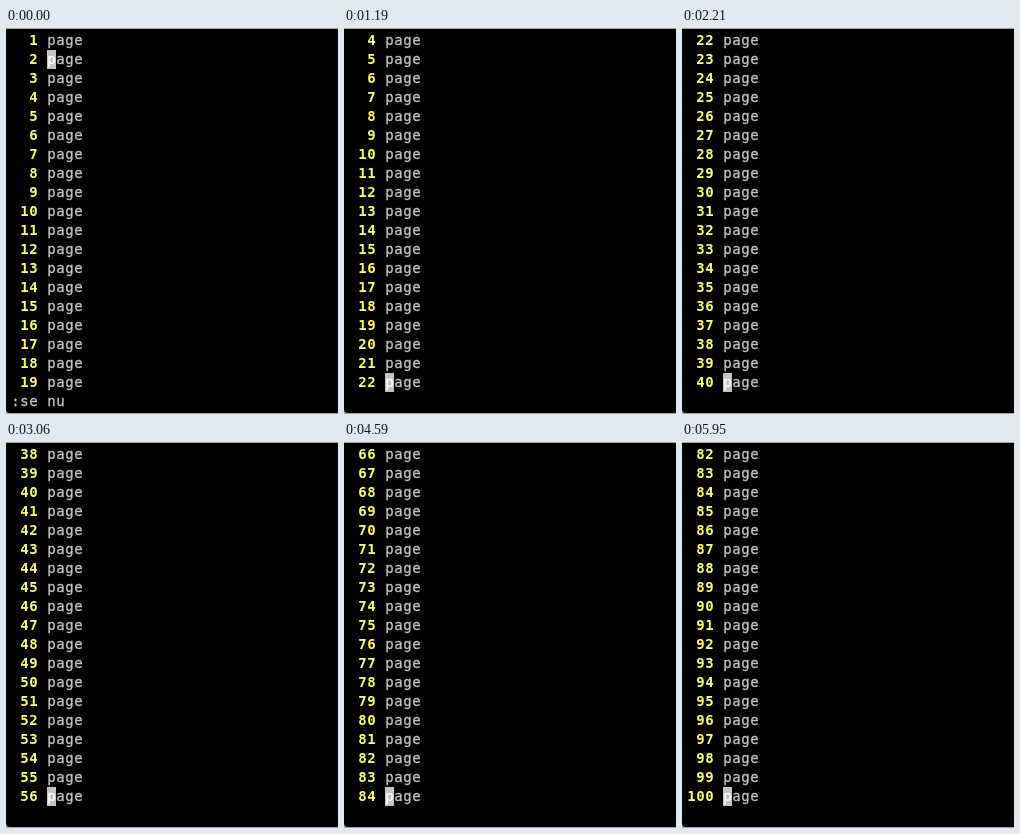
An HTML page with a canvas that plays this animation: 332x386 px, repeating every 6120 ms.

```html
<!DOCTYPE html>
<html lang="en">
<head>
<meta charset="utf-8">
<title>Scrolling numbered lines</title>
<style>
html, body { margin: 0; width: 332px; height: 386px; overflow: hidden; background: #000; }
canvas { display: block; }
</style>
</head>
<body>
<canvas id="stage" width="332" height="386"></canvas>
<script>
const ctx = document.getElementById('stage').getContext('2d');
const STEP = 170, STEPS = 36, ROWS = 19, ROW_H = 19, LEFT = 5, CHAR_W = 9;
const TEXT_X = LEFT + 4 * CHAR_W, WORD = 'page';
const GREY = '#c4c4c4', YELLOW = '#ffff5c';

// [step, line under the cursor]; the cursor runs evenly between these
const keys = [[0, 2], [7, 22], [13, 40], [18, 56], [23, 72], [31, 96], [35, 100]];

function cursorLine(step) {
  const i = Math.max(1, keys.findIndex(k => k[0] >= step));
  const [s0, l0] = keys[i - 1], [s1, l1] = keys[i];
  return Math.round(l0 + (l1 - l0) * (step - s0) / (s1 - s0));
}

// one character per terminal cell, slightly thickened
function write(text, x, row, color, weight = 'normal') {
  ctx.font = `${weight} 14px "DejaVu Sans Mono", monospace`;
  ctx.textAlign = 'center';
  ctx.fillStyle = ctx.strokeStyle = color;
  ctx.lineWidth = 0.3;
  [...text].forEach((char, i) => {
    const at = [char, x + (i + 0.5) * CHAR_W, 17 + row * ROW_H];
    ctx.fillText(...at);
    if (weight === 'normal') ctx.strokeText(...at);
  });
}

function draw(step) {
  const line = cursorLine(step);
  const top = Math.max(1, line - ROWS + 1);

  // window with thin edges above and below and a rounded lower corner
  ctx.fillStyle = '#a0a0a0';
  ctx.fillRect(0, 0, 332, 386);
  ctx.fillStyle = '#000';
  ctx.beginPath();
  ctx.roundRect(0, 1, 332, 384, [0, 0, 0, 4]);
  ctx.fill();

  for (let row = 0; row < ROWS; row++) {
    const n = top + row;
    write(String(n).padStart(3), LEFT, row, YELLOW, 'bold');
    write(WORD, TEXT_X, row, GREY);
    if (n === line) {
      ctx.fillStyle = GREY;
      ctx.fillRect(TEXT_X, 3 + row * ROW_H, CHAR_W, ROW_H);
      write(WORD[0], TEXT_X, row, '#fff');
    }
  }
  // the command stays until the first scroll
  if (top === 1) write(':se nu', LEFT, ROWS, GREY);
}

const start = performance.now();
function tick() {
  draw(Math.floor((performance.now() - start) / STEP) % STEPS);
  requestAnimationFrame(tick);
}
tick();
</script>
</body>
</html>
```
